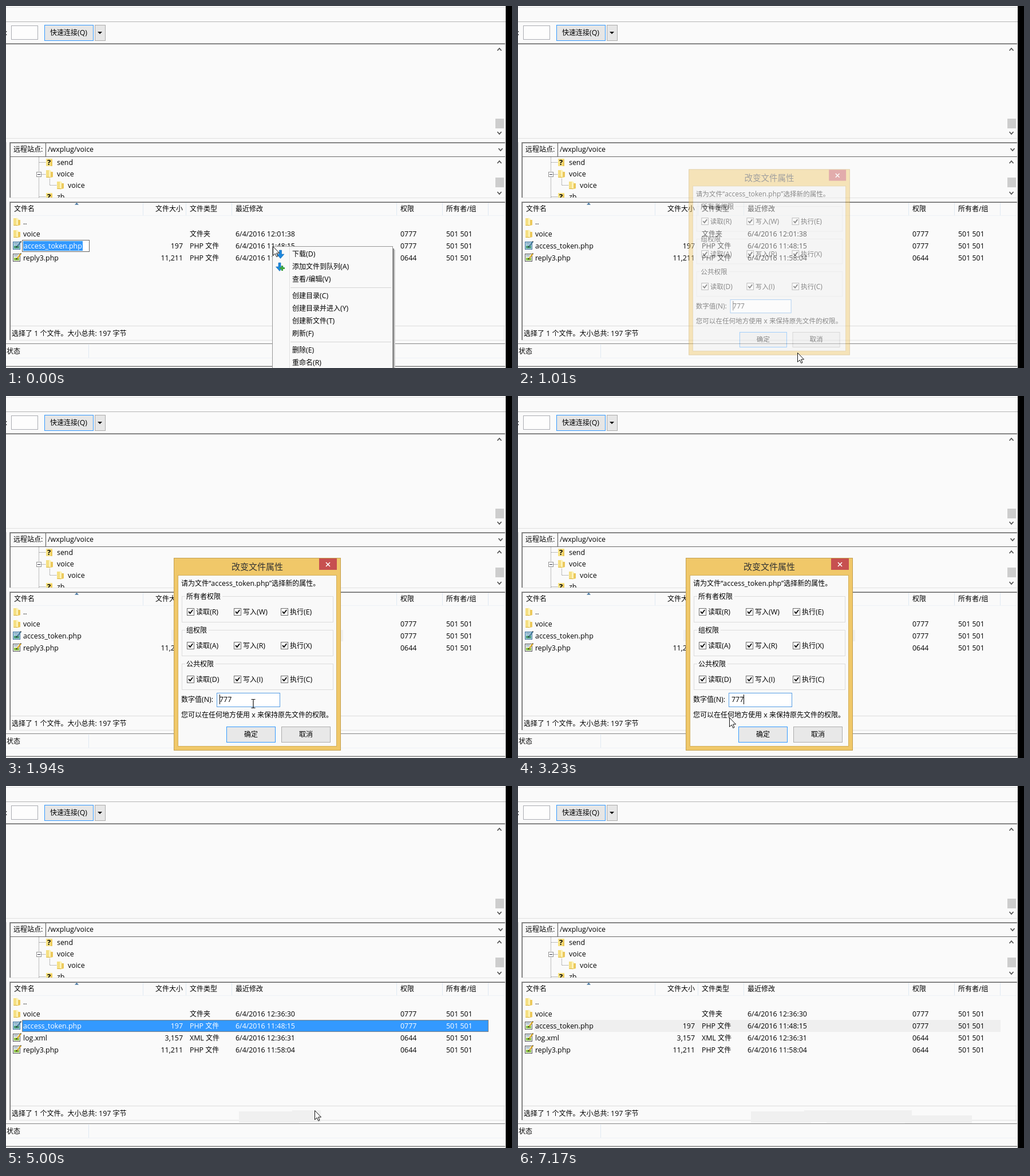
Write an HTML page that moves like this. It is 884 by 633 pixels and loops after 7270 ms.

```html
<!DOCTYPE html>
<html lang="zh">
<head>
<meta charset="utf-8">
<title>File permissions</title>
<style>
html, body { margin: 0; width: 100%; height: 100%; overflow: hidden; background: #fafafa; }
svg { display: block; width: 884px; height: 633px; }
text { font: 12.4px "Open Sans", "Noto Sans", "Noto Sans CJK SC", "Noto Sans CJK", sans-serif; white-space: pre; }
.cjk { font-size: 12px; font-family: "Noto Sans CJK SC", "Noto Sans CJK", sans-serif; }
.title .cjk { font-size: 15px; }
</style>
</head>
<body>
<svg id="stage" viewBox="0 0 884 633" xmlns="http://www.w3.org/2000/svg"></svg>
<script>
const LOOP = 7270, BLUE = '#3399ff', CLIENT = 'var(--client)';

// ---- markup helpers ----
const rect = (x, y, w, h, fill, extra = '') =>
  `<rect x="${x}" y="${y}" width="${w}" height="${h}" style="fill:${fill}" ${extra}/>`;
const frame = (x, y, w, h, fill, stroke) =>
  rect(x + .5, y + .5, w - 1, h - 1, fill, `stroke="${stroke}"`);
const hline = (x1, x2, y, color) => rect(x1, y, x2 - x1, 1, color);
const vline = (x, y1, y2, color) => rect(x, y1, 1, y2 - y1, color);
const path = (d, extra) => `<path d="${d}" ${extra}/>`;
const group = (id, body, extra = '') => `<g id="${id}" ${extra}>${body}</g>`;
const text = (x, y, s, extra = '') =>
  `<text x="${x}" y="${y}" ${extra}>${s.replace(/[\u3000-\u9fff]+/g, '<tspan class="cjk">$&</tspan>')}</text>`;
const chevron = (x, y, dir) =>
  path(`M${x - 3.5} ${y + 2 * dir}l3.5 ${-4 * dir}l3.5 ${4 * dir}`, 'fill="none" stroke="#505050" stroke-width="1.7"');
// two-tone top and left edges of a sunken pane
const sunken = (y, bottom) =>
  hline(6, 872, y, '#a0a0a0') + vline(6, y, bottom, '#a0a0a0') +
  hline(7, 872, y + 1, '#696969') + vline(7, y + 1, bottom, '#696969');

const folder = (x, y) =>
  path(`M${x} ${y + 1}h5l1 2v11h-6z`, 'fill="#f5df83"') +
  path(`M${x + 5} ${y}l4 2v12l-4 1z`, 'fill="#fdf3b8"') +
  path(`M${x + 8} ${y + 4}h4v9l-4 1z`, 'fill="#ecc95c"') +
  path(`M${x + .5} ${y + 13.5}h7`, 'stroke="#d9b347"');
const unknownFolder = (x, y) =>
  rect(x + 1, y + 1, 11, 13, '#f7e284') + rect(x + 9, y + 3, 3, 11, '#ecc95c') +
  text(x + 3, y + 12, '?', 'style="font-weight:700;font-size:13px"');
const fileIcon = (x, y, tinted) =>
  frame(x, y + 1, 13, 14, tinted ? '#b9dcf2' : '#fff', tinted ? '#3c6e96' : '#555') +
  rect(x + 2, y + 3, 7, 1, '#7794a8') + rect(x + 2, y + 5, 6, 1, '#7794a8') +
  rect(x + 2, y + 8, 9, 5, tinted ? '#4c9d77' : '#8bc34a') +
  path(`M${x + 7} ${y + 10}l7 -9`, `stroke="${tinted ? '#4a7d9a' : '#d9a92c'}" stroke-width="2.4"`) +
  path(`M${x + 6} ${y + 11}l1.5 -2M${x + 13.5} ${y + 1.5}l1 -1`, 'stroke="#333" stroke-width="1.6"');

const cells = (y, name, size, type, date, perm) =>
  text(30, y, name) + text(309, y, size, 'text-anchor="end"') +
  text(321, y, type) + text(401, y, date) + text(689, y, perm) + text(769, y, '501 501');

// ---- window ----
function windowChrome() {
  const columns = [239, 314, 394, 682, 762, 842].map(x => vline(x, 344, 366, '#dfe9f2')).join('');
  const dots = 'fill="none" stroke="#808080" stroke-dasharray="1 1"';
  return rect(0, 0, 884, 633, '#fafafa') +
    hline(0, 873, 2, '#e2e2e2') + hline(0, 873, 27, '#b4b4b4') +
    text(-1, 51, ':') + frame(9, 34, 47, 25, '#fdfdfd', '#abadb3') +
    frame(67, 33, 86, 28, '#e6e6e6', BLUE) + text(77, 51, '快速连接(Q)') +
    frame(155, 33, 19, 28, '#e6e6e6', '#acacac') + path('M160 45h8l-4 4z', '') +
    hline(0, 872, 65, '#a0a0a0') + hline(0, 872, 66, '#696969') +
    chevron(862, 76, 1) + rect(855, 197, 15, 17, '#cdcdcd') + chevron(862, 222, -1) +
    hline(0, 872, 231, '#e0e0e0') + vline(0, 238, 584, '#d5d5d5') +
    sunken(238, 336) +
    vline(69, 240, 263, '#505050') + hline(8, 872, 263, '#686868') +
    text(13, 255, '远程站点:') + text(73, 255, '/wxplug/voice') + chevron(864, 251, -1) +
    '<clipPath id="tree"><rect x="8" y="264" width="864" height="71"/></clipPath><g clip-path="url(#tree)">' +
    path('M57.5 264V336M58 273.5H69M62 294.5H69M58 333.5H69M76.5 302V313.5H88', dots) +
    frame(53, 290, 9, 9, '#fff', '#919191') + hline(55, 60, 294, '#334') +
    unknownFolder(69, 266) + text(89, 278, 'send') +
    folder(70, 286) + text(89, 298, 'voice') +
    folder(89, 306) + text(108, 318, 'voice') +
    unknownFolder(69, 326) + text(89, 338, 'zb') + '</g>' +
    chevron(862, 273, 1) + rect(855, 300, 15, 17, '#cdcdcd') + chevron(862, 327, -1) +
    hline(6, 872, 335, '#e2e2e2') +
    sunken(342, 584) +
    columns + hline(8, 872, 366, '#eef2f6') + path('M120 347.5l3.5 -3.5l3.5 3.5z', 'fill="#3c6f9c"') +
    text(14, 359, '文件名') + text(309, 359, '文件大小', 'text-anchor="end"') + text(321, 359, '文件类型') +
    text(401, 359, '最近修改') + text(689, 359, '权限') + text(769, 359, '所有者/组') +
    hline(8, 872, 559, '#dcdcdc') + vline(870, 559, 584, '#dcdcdc') + hline(6, 872, 584, '#e0e0e0') +
    group('trail', '') + text(10, 577, '选择了 1 个文件。大小总共: 197 字节') +
    hline(0, 872, 590, '#858585') + text(1, 608, '状态') +
    vline(144, 592, 615, '#dfe9f2') + hline(0, 872, 615, '#eef2f6') + rect(0, 629.5, 872, 1.5, '#808080');
}

function fileList() {
  return folder(13, 370) + text(30, 382, '..') + folder(13, 391) +
    group('rowBack', rect(28, 409, 815, 21, 'inherit')) +
    group('rowFocus', path('M28.5 409.5H842.5V429.5H28.5Z', 'fill="none" stroke="#cc6600" stroke-dasharray="1 1"')) +
    group('accessRow', cells(424, 'access_token.php', '197', 'PHP 文件', '6/4/2016 11:48:15', '0777')) +
    group('iconTinted', fileIcon(12, 411, true)) + group('iconPlain', fileIcon(12, 411)) +
    group('oldRows', cells(403, 'voice', '', '文件夹', '6/4/2016 12:01:38', '0777') +
      fileIcon(12, 432) + cells(445, 'reply3.php', '11,211', 'PHP 文件', '6/4/2016 11:58:04', '0644')) +
    group('newRows', cells(403, 'voice', '', '文件夹', '6/4/2016 12:36:30', '0777') +
      fileIcon(12, 432) + cells(445, 'log.xml', '3,157', 'XML 文件', '6/4/2016 12:36:31', '0644') +
      fileIcon(12, 453) + cells(466, 'reply3.php', '11,211', 'PHP 文件', '6/4/2016 11:58:04', '0644')) +
    group('rename', frame(28, 409, 118, 21, '#fff', '#646464') + rect(30, 411, 104, 17, BLUE) +
      text(31, 424, 'access_token.php', 'fill="#fff"'));
}

// ---- context menu ----
function menu() {
  const items = [[438, '下载(D)'], [460, '添加文件到队列(A)'], [482, '查看/编辑(V)'], [511, '创建目录(C)'],
    [533, '创建目录并进入(Y)'], [555, '创建新文件(T)'], [577, '刷新(F)'], [606, '删除(E)'], [628, '重命名(R)']];
  const arrow = (x, y) => path(`M${x - 2} ${y - 7}h4v7h4.5l-6.5 7.5l-6.5 -7.5h4.5z`, 'fill="#1e88dd" stroke="#1668b0" stroke-width=".6"');
  return rect(676, 424, 2, 209, '#888') + rect(678, 426, 2, 207, '#d2d2d2') +
    frame(465, 420, 211, 220, '#f9f9f9', '#979797') +
    group('menuShade', rect(467, 424, 207, 209, '#f0f0f0')) +
    vline(495, 422, 633, '#dedede') + vline(496, 422, 633, '#fff') +
    hline(497, 673, 492, '#d4d4d4') + hline(497, 673, 587, '#d4d4d4') +
    rect(468, 0, 205, 21, '#d3e7f8', 'id="hover" stroke="#a5cdec"') +
    arrow(479.5, 434) + arrow(478, 456) + path('M482.5 454v9M478 458.5h9', 'stroke="#3fa53f" stroke-width="3"') +
    items.map(([y, s]) => text(500, y, s)).join('');
}

// ---- permissions dialog ----
function dialog() {
  const check = (x, y, label) => frame(x, y - 11, 13, 13, '#fff', '#6a6a6a') +
    path(`M${x + 3} ${y - 5}l2.7 3l4.5 -6`, 'fill="none" stroke="#111" stroke-width="2"') + text(x + 16, y, label);
  const section = (y, name, keys) =>
    frame(307, y, 265, 46, 'none', '#dcdcdc') +
    rect(313, y - 3, name.length * 12 + 5, 7, CLIENT) + text(315, y + 5, name) +
    ['读取', '写入', '执行'].map((s, i) => check(316 + 82 * i, y + 32, `${s}(${keys[i]})`)).join('');
  return frame(293, 283, 292, 337, '#f0c869', '#c39f4e') +
    text(439, 304, '改变文件属性', 'class="title" text-anchor="middle" fill="#333"') +
    rect(547, 284, 31, 20, '#c75050') + path('M559 291l7 7m0 -7l-7 7', 'stroke="#fff" stroke-width="1.6"') +
    frame(300, 313, 278, 300, CLIENT, '#d2ae5a') +
    text(306, 332, '请为文件“access_token.php”选择新的属性。') +
    section(350, '所有者权限', 'RWE') + section(409, '组权限', 'ARX') + section(468, '公共权限', 'DIC') +
    text(306, 535, '数字值(N):') + frame(368, 519, 111, 25, '#fff', '#569de5') +
    group('digits', '') + rect(0, 522, 1, 17, '#000', 'id="caret"') +
    text(306, 562, '您可以在任何地方使用 x 来保持原先文件的权限。') +
    frame(385, 578, 86, 28, '#e8e8e8', BLUE) +
    group('okHover', frame(385, 578, 86, 28, '#cfe6f8', '#3c8fd0')) +
    text(428, 596, '确定', 'text-anchor="middle"') +
    frame(481, 578, 86, 28, '#e8e8e8', '#adadad') + text(524, 596, '取消', 'text-anchor="middle"');
}

const pointers =
  group('arrow', path('M.5 .5V16.5L4.2 13L6.7 18.5L9 17.5L6.6 12H11.5Z', 'fill="#fff" stroke="#111"')) +
  group('beam', path('M-3.5 -7.5h3l.5 .5l.5 -.5h3M0 -7V7M-3.5 7.5h3l.5 -.5l.5 .5h3', 'fill="none" stroke="#111" stroke-width="1.2"'));

document.getElementById('stage').innerHTML = windowChrome() + fileList() +
  group('menu', menu()) +
  group('sides', rect(289, 409, 4, 20, '#f0f0f0') + rect(585, 409, 4, 20, '#f0f0f0')) +
  group('dialog', dialog()) + pointers + rect(873, 0, 11, 633, '#000');

// ---- timeline: [start, ...state], each held until the next ----
const CURSOR = [[0, 'arrow', 466, 420], [150, 'arrow', 466, 424], [300, 'arrow', 480, 540], [420, 'arrow', 492, 614],
  [580, ''], [1010, 'arrow', 488, 606], [1130, 'arrow', 486, 599], [1280, 'arrow', 448, 520], [1400, 'arrow', 398, 423],
  [1550, 'beam', 386, 524], [1700, 'arrow', 327, 554], [1820, 'beam', 402, 546], [1940, 'beam', 432, 538],
  [2060, 'beam', 384, 530], [2210, 'beam', 241, 538], [2360, 'arrow', 238, 537], [2770, ''], [3230, 'arrow', 369, 562],
  [3520, 'arrow', 397, 571], [3660, 'arrow', 405, 581], [3780, 'arrow', 407, 585], [4700, 'arrow', 500, 569],
  [4850, 'arrow', 538, 567], [5000, 'arrow', 539, 567], [5750, 'arrow', 676, 576], [6030, 'arrow', 781, 608],
  [6180, 'arrow', 790, 619], [6300, '']];
const HOVER = [[0, 0], [300, 540], [420, 613], [580, 0]];
// opacity, scale, client colour
const DIALOG = [[0, 0, 1, ''], [1010, .45, .965, '#f0f0f0'], [1130, .88, .99, '#f0f0f0'], [1280, .97, .998, '#f9f9f9'],
  [1400, 1, 1, '#f9f9f9'], [4020, .93, 1, '#f9f9f9'], [4180, 0, 1, '']];
// digits shown, first selected digit
const VALUE = [[0, 3, 3], [2060, 3, 2], [2210, 3, 0], [2770, 1, 1], [2920, 2, 2], [3230, 3, 3]];
// shaded strips left behind the pointer in the status bar
const TRAIL = [[4700, 407, 569, 105, 20], [4850, 500, 567, 50, 21], [5750, 539, 567, 149, 22], [6030, 676, 576, 117, 14]];

const at = (keys, t) => keys.filter(k => k[0] <= t).pop();
const el = id => document.getElementById(id);
const show = (id, on) => el(id).setAttribute('display', on ? 'inline' : 'none');
const move = (id, x, y) => el(id).setAttribute('transform', `translate(${x} ${y})`);

function drawValue(t) {
  const [, count, first] = at(VALUE, t), step = 7.1, x0 = 373;
  const selected = first < count;
  el('digits').innerHTML =
    (selected ? rect(x0 + first * step, 522, (count - first) * step, 17, BLUE) : '') +
    text(x0, 535, '7'.repeat(first)) +
    (selected ? text(x0 + first * step, 535, '7'.repeat(count - first), 'fill="#fff"') : '');
  show('caret', !selected && t < 3660);
  el('caret').setAttribute('x', t < 2060 ? x0 : Math.round(x0 + count * step));
}

function drawDialog(t) {
  const [, alpha, scale, client] = at(DIALOG, t), node = el('dialog');
  show('dialog', alpha);
  show('sides', t >= 1130 && t < 4020);
  node.setAttribute('opacity', alpha);
  node.setAttribute('transform', `translate(439 350) scale(${scale}) translate(-439 -350)`);
  node.style.setProperty('--client', client);
  show('okHover', t >= 3660);
  drawValue(t);
}

function draw(t) {
  const [, kind, x, y] = at(CURSOR, t);
  for (const id of ['arrow', 'beam']) {
    show(id, id === kind);
    if (id === kind) move(id, x, y);
  }

  const hoverY = at(HOVER, t)[1];
  show('menu', t < 1010);
  show('rename', t < 1010);
  show('menuShade', t >= 300);
  show('hover', hoverY);
  el('hover').setAttribute('y', hoverY);

  drawDialog(t);

  const active = t >= 4020 && t < 7170, refreshed = t >= 4180;
  show('rowBack', t >= 4020);
  show('rowFocus', active);
  el('rowBack').setAttribute('fill', active ? BLUE : '#efefef');
  el('accessRow').setAttribute('fill', active ? '#fff' : '#000');
  show('iconTinted', t < 7170);
  show('iconPlain', t >= 7170);
  show('oldRows', !refreshed);
  show('newRows', refreshed);
  el('trail').innerHTML = TRAIL.filter(k => k[0] <= t).map(([, ...box]) => rect(...box, '#f0f0f0')).join('');
}

const start = performance.now();
function tick() {
  draw((performance.now() - start) % LOOP);
  requestAnimationFrame(tick);
}
tick();
</script>
</body>
</html>
```
